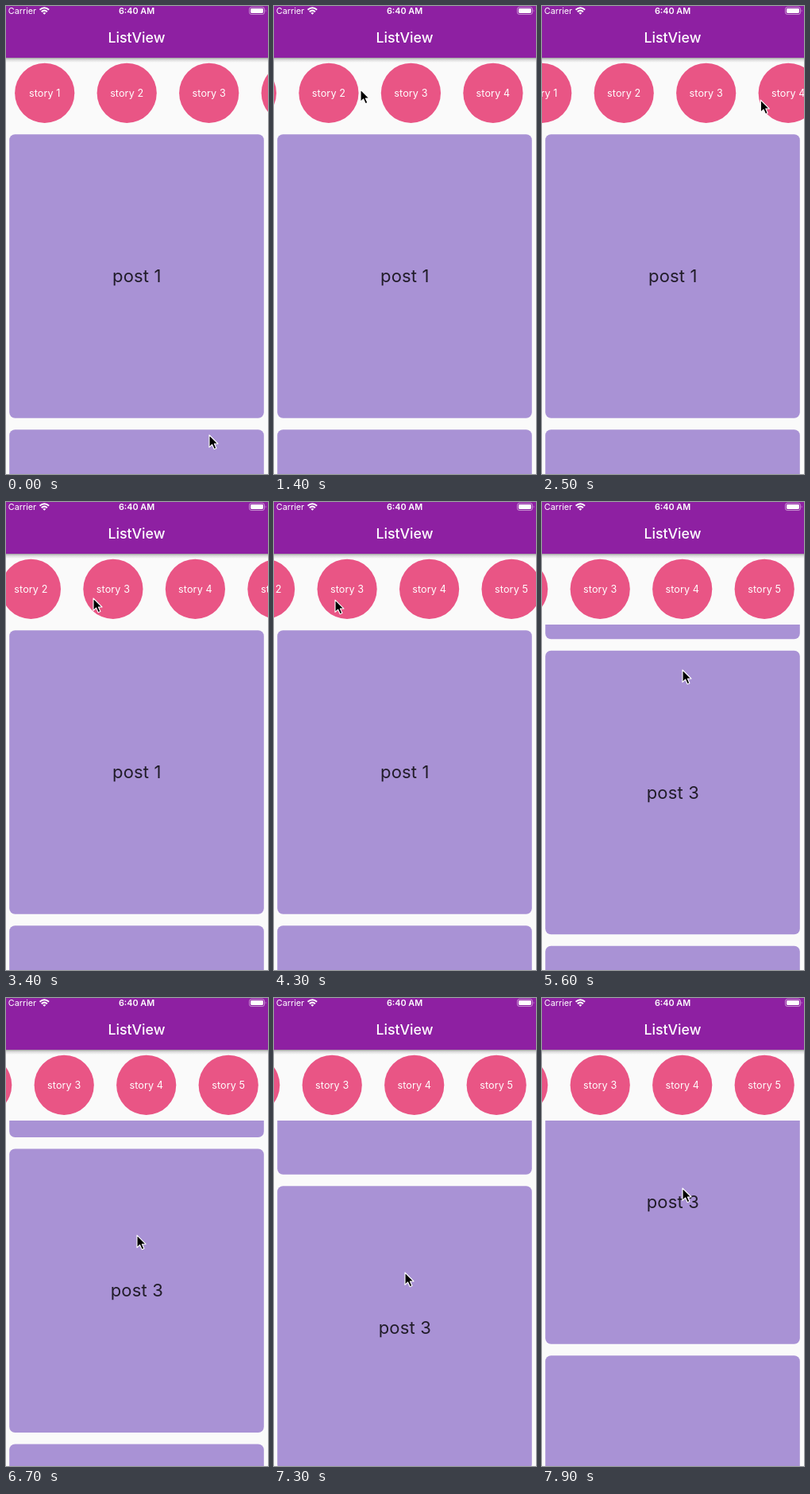
An HTML page that plays this animation: 330x588 px, repeating every 8000 ms.

```html
<!DOCTYPE html>
<html lang="en">
<head>
<meta charset="utf-8">
<title>ListView</title>
<style>
  html, body { margin: 0; width: 100%; height: 100%; overflow: hidden; background: #fafafa; }
  svg { display: block; width: 330px; height: 588px; font-family: Inter, Roboto, sans-serif; }
  text { text-anchor: middle; }
  .story { font-size: 12.6px; fill: #fff; letter-spacing: .1px; }
  .post { font-size: 22px; fill: #211c29; letter-spacing: .15px; }
  .status { font-size: 10.8px; fill: #fff; }
</style>
</head>
<body>
<svg viewBox="0 0 330 588">
  <defs>
    <clipPath id="listClip"><rect y="154" width="330" height="434"/></clipPath>
    <linearGradient id="shade" x2="0" y2="1">
      <stop stop-color="#000" stop-opacity=".36"/>
      <stop offset=".4" stop-color="#000" stop-opacity=".13"/>
      <stop offset="1" stop-color="#000" stop-opacity="0"/>
    </linearGradient>
  </defs>
  <rect width="330" height="588" fill="#fafafa"/>
  <g clip-path="url(#listClip)"><g id="posts"></g></g>
  <g id="stories"></g>

  <rect y="65" width="330" height="6" fill="url(#shade)"/>
  <rect width="330" height="65" fill="#8e20a2"/>
  <text x="164.5" y="46" font-size="17.8" font-weight="500" fill="#fff">ListView</text>
  <text class="status" x="20.5" y="10">Carrier</text>
  <text class="status" x="164.5" y="10" font-weight="600">6:40 AM</text>
  <g fill="none" stroke="#fff" stroke-width="2">
    <path d="M42.5 4.8Q48.3-.4 54.1 4.8M44.7 7.2Q48.3 4 51.9 7.2"/>
    <path d="M48.3 10.8L46.3 8.8Q48.3 7.3 50.3 8.8Z" fill="#fff" stroke="none"/>
  </g>
  <rect x="306.5" y="1.5" width="19" height="9" rx="2.6" fill="none" stroke="#fff" stroke-opacity=".5"/>
  <rect x="308" y="3" width="16" height="6" rx="1.4" fill="#fff"/>
  <path d="M326.8 4.5Q328.4 6 326.8 7.5Z" fill="#fff" fill-opacity=".6"/>

  <path id="cursor" d="M0 0V15.4L3.6 12L6.2 17.7L8.9 16.5L6.4 11H11Z"
        fill="#000" stroke="#fff" stroke-width="1.1" stroke-linejoin="round"/>
</svg>
<script>
const DURATION = 8000;
const byId = id => document.getElementById(id);
const stories = byId('stories'), posts = byId('posts'), cursor = byId('cursor');

const eases = {
  glide: u => u * u * (3 - 2 * u),
  drag: u => u ** 1.4,
  fling: u => 1 - (1 - u) ** 3,
  fastFling: u => 1 - (1 - u) ** 5
};

// Each key: time, value(s), then the easing used to arrive there.
const storyKeys = [
  [0, 0], [1150, 0], [1400, 82.5, 'drag'], [1850, 199.5, 'fling'], [2200, 199.5],
  [2500, 49.5, 'drag'], [2800, 0, 'fling'], [3100, 0], [3400, 120, 'drag'],
  [3700, 200, 'fling'], [4000, 60, 'glide'], [4300, 163.5, 'drag'], [4800, 182.5, 'fling']
];
const postKeys = [
  [0, 0], [4950, 0], [5300, 322, 'drag'], [6250, 785.5, 'fastFling'],
  [6700, 714, 'drag'], [6900, 677], [7300, 667, 'fling'], [7700, 767, 'glide'], [7900, 825]
];
const cursorKeys = [
  [0, [256, 539]], [900, [250, 518], 'glide'], [1150, [192, 108], 'glide'],
  [1400, [109, 105], 'drag'], [2200, [125, 112], 'glide'], [2500, [275, 118], 'drag'],
  [2700, [300, 120], 'fling'], [3100, [230, 120], 'glide'], [3400, [110, 121], 'drag'],
  [3700, [40, 122], 'glide'], [4000, [180, 122], 'glide'], [4300, [77, 123], 'drag'],
  [4500, [165, 498], 'glide'], [4950, [172, 533], 'glide'], [5300, [177, 211], 'drag'],
  [5600, [177, 211]], [6250, [172, 226], 'glide'], [6700, [165, 298], 'drag'],
  [6900, [163, 335]], [7300, [165, 345], 'fling'], [7700, [176, 245], 'glide'],
  [7900, [177, 239], 'fling']
];

function sample(keys, time) {
  const next = keys.findIndex(key => key[0] > time);
  if (next < 0) return keys[keys.length - 1][1];
  const [start, from] = keys[next - 1];
  const [end, to, ease] = keys[next];
  const linear = (time - start) / (end - start);
  const u = ease ? eases[ease](linear) : linear;
  const mix = (a, b) => a + (b - a) * u;
  return Array.isArray(from) ? from.map((a, i) => mix(a, to[i])) : mix(from, to);
}

const repeat = (count, draw) => Array.from({ length: count }, (_, i) => draw(i)).join('');

stories.innerHTML = repeat(8, i => {
  const x = 48.7 + 103.5 * i;
  return `<circle cx="${x}" cy="109.3" r="37.6" fill="#e95585"/>
    <text class="story" x="${x}" y="113.5">story ${i + 1}</text>`;
});
posts.innerHTML = repeat(6, i => {
  const y = 161.2 + 371 * i;
  return `<rect x="4.2" y="${y}" width="320.6" height="356.6" rx="7.2" fill="#a992d5"/>
    <text class="post" x="164.8" y="${y + 186}">post ${i + 1}</text>`;
});

function render(time) {
  const move = (node, x, y) => node.setAttribute('transform', `translate(${x} ${y})`);
  move(stories, -sample(storyKeys, time), 0);
  move(posts, 0, -sample(postKeys, time));
  move(cursor, ...sample(cursorKeys, time));
}

const began = performance.now();
function tick() {
  render((performance.now() - began) % DURATION);
  requestAnimationFrame(tick);
}
render(0);
requestAnimationFrame(tick);
</script>
</body>
</html>
```
